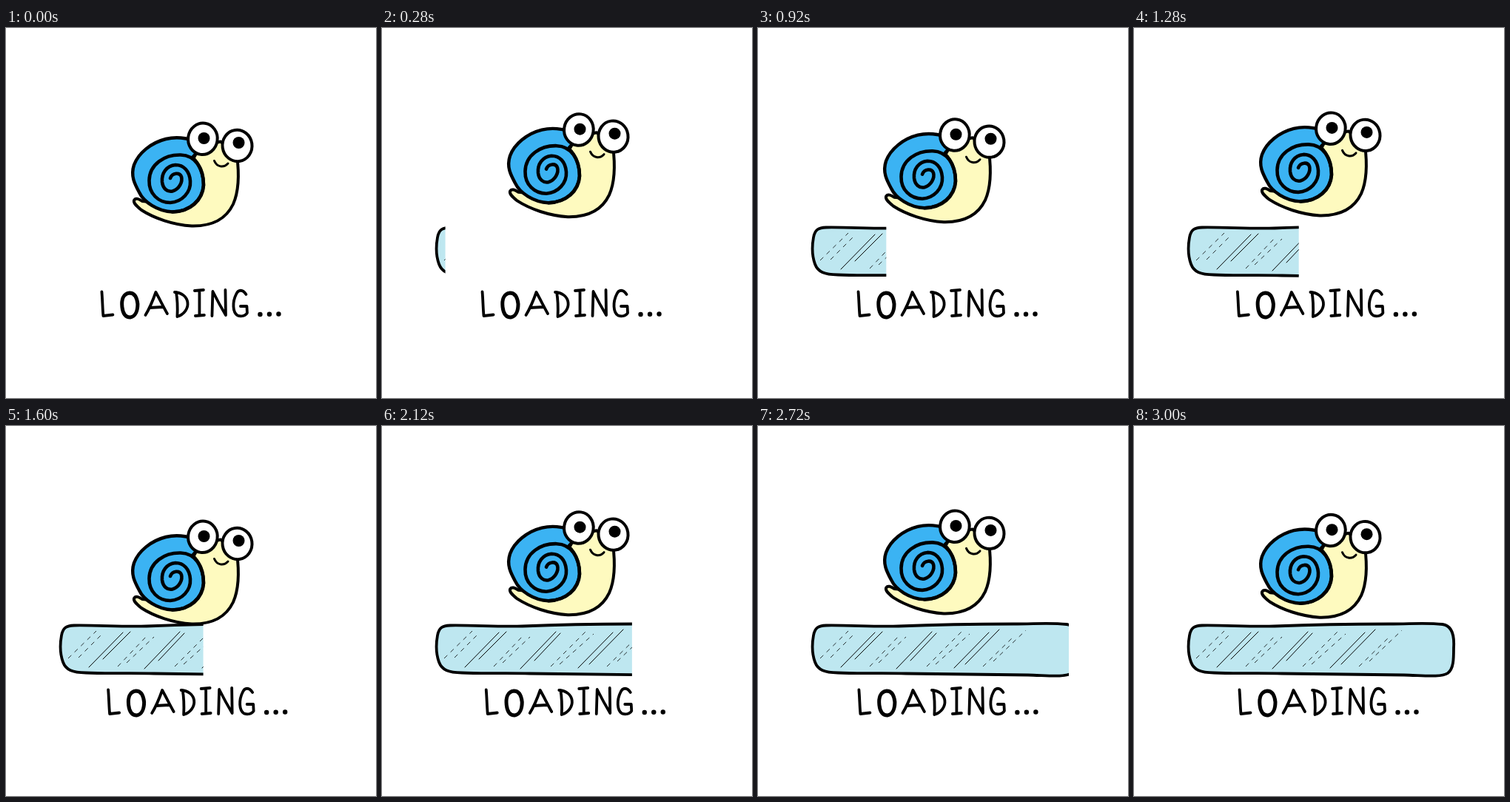
An HTML page for the animation above (3.04 s loop, 500 px wide and 500 px high).

```html
<!DOCTYPE html>
<html lang="en">
<head>
<meta charset="utf-8">
<title>Loading</title>
<style>
html, body { margin: 0; width: 100%; height: 100%; overflow: hidden; background: #fff; }
svg { display: block; width: 100%; height: 100%; }
path, ellipse { fill: none; stroke: #000; stroke-linecap: round; stroke-linejoin: round; }
#snail path, #snail ellipse { stroke-width: 4; }
#snail .coil { stroke-width: 4.6; }
#snail .thin { stroke-width: 3; }
#snail .eye { fill: #fff; }
#snail .body { fill: #fefabf; }
#snail .shell { fill: #3bb3f3; stroke-width: 4.4; }
#bar .glass { fill: #bee7f0; stroke-width: 3.8; }
#bar .shine { stroke-width: 1; }
#bar .dashed { stroke-width: .8; stroke-dasharray: 6 6; stroke-linecap: butt; }
#word path { stroke-width: 3.8; }
#word .bold { stroke-width: 5; }
</style>
</head>
<body>
<svg viewBox="0 0 500 500">
  <clipPath id="wipe"><rect id="reveal" x="0" y="250" width="0" height="100"/></clipPath>

  <g id="bar" clip-path="url(#wipe)">
    <path class="glass" d="M92 269.500C125 269 155 271.500 190 270.500C250 268 300 267.500 345 267.500
      C375 267.500 395 265.500 417 268C431 270 433 285 432 300C432 315 432 328 424 334
      C415 340 390 337 365 336.500C300 336 250 335.500 200 334.500C165 333.500 135 335 108 333.500
      C90 333 81 330 77 319C73 308 73 294 75 283C77 272 82 270 92 269.500Z"/>
    <path class="shine" d="M112 326L158 279M131 315L168 278M187 328L235 278M206 317L241 280
      M265 327L312 279M280 322L326 275"/>
    <path class="dashed" d="M84 314L122 277M98 313L131 280M151 325L190 284M163 320L200 285
      M228 325L275 278M240 322L286 281M304 325L346 284M318 318L362 276"/>
  </g>

  <g id="snail">
    <path class="body" d="M253 177L262 160L290 153.500L312 172C315 195 315 220 307 238
      C297 259 277 268 251 267.500C226 266 200 257 183 246C177 241 172 237 173 233
      C175 229 180 231 184 234L205 236Z"/>
    <path class="shell" d="M254 152C241 148 228 147 216 150C196 155 179 169 173 185
      C168 200 174 211 180 222C186 235 205 248 225 248.500C249 248 265 232 267 213
      C267 199 262 184 252 175L260 166Z"/>
    <path class="coil" d="M225 248.500C249 248 266 233 267 212C267 190 256 172 236 171.500
      C214 171 194 184 193.500 206C193 224 206 236 222 236C238 235 250 222 249 207
      C248 193 240 185 229 185C217 186 210 196 211 208C212 217 218 222 225 220.500
      C234 218 239 208 237 201C235 195 225 195 222 203"/>
    <ellipse class="eye" cx="266" cy="149.800" rx="19.800" ry="21.300" transform="rotate(8 266 149)"/>
    <ellipse class="eye" cx="312.500" cy="159" rx="20" ry="21.200" transform="rotate(-8 312 159)"/>
    <circle cx="267.500" cy="149" r="8"/>
    <circle cx="314.500" cy="155" r="8"/>
    <path class="thin" d="M281.500 179.500C285 188 294 189.500 300 183"/>
  </g>

  <g id="word" role="img" aria-label="LOADING...">
    <path d="M129.500 356.500C130.500 368 130.500 379 131.500 389L144.500 387.500"/>
    <path class="bold" d="M167 358C158 359 156 368 157 377C158 386 162 391 168 391
      C175 390 178 382 178 373C177 364 174 358 167 358Z"/>
    <path d="M188.500 388C194 379 199 367 202.500 357C208 367 213 377 218 386M194 378L212 377"/>
    <path d="M230 357C232 368 232 380 231.500 390C241 387 246.500 379 245.500 371
      C244.500 363 238 358 228 357"/>
    <path d="M255 355L267 354M261.500 355L261.500 388M256 389L268 388"/>
    <path d="M278.500 389L279.500 356C285 367 291 378 297 388L296.500 354"/>
    <path d="M324.500 360C320 353 314 353 311 360C306 370 306 384 313 388.500C318 390.500 324 389 326 385
      L325.500 376L317 376"/>
    <circle cx="343.500" cy="387" r="3.200"/>
    <circle cx="356" cy="386.800" r="3.200"/>
    <circle cx="368.500" cy="386.500" r="3.200"/>
  </g>
</svg>
<script>
const LOOP = 3040, STEP = 40, SWING = 800;
const get = id => document.getElementById(id);
const snail = get('snail'), word = get('word'), reveal = get('reveal');

// Triangle wave: 0 at the start of each swing, 1 halfway through
const triangle = t => 1 - Math.abs(2 * (t / SWING % 1) - 1);

function draw(now) {
  const t = Math.floor(now % LOOP / STEP) * STEP;
  const lift = 17.6 * triangle(t);
  // The word glides right for 600 ms, then sways back and forth
  const fromPeak = t < 600 ? 600 - t : triangle(t - 600) * SWING / 2;
  const shift = 13 - 0.0218 * fromPeak;
  snail.setAttribute('transform', `translate(0 ${-lift})`);
  word.setAttribute('transform', `translate(${shift} 0)`);
  reveal.setAttribute('width', 47.2 + 0.1371 * t);
  requestAnimationFrame(draw);
}
requestAnimationFrame(draw);
</script>
</body>
</html>
```
